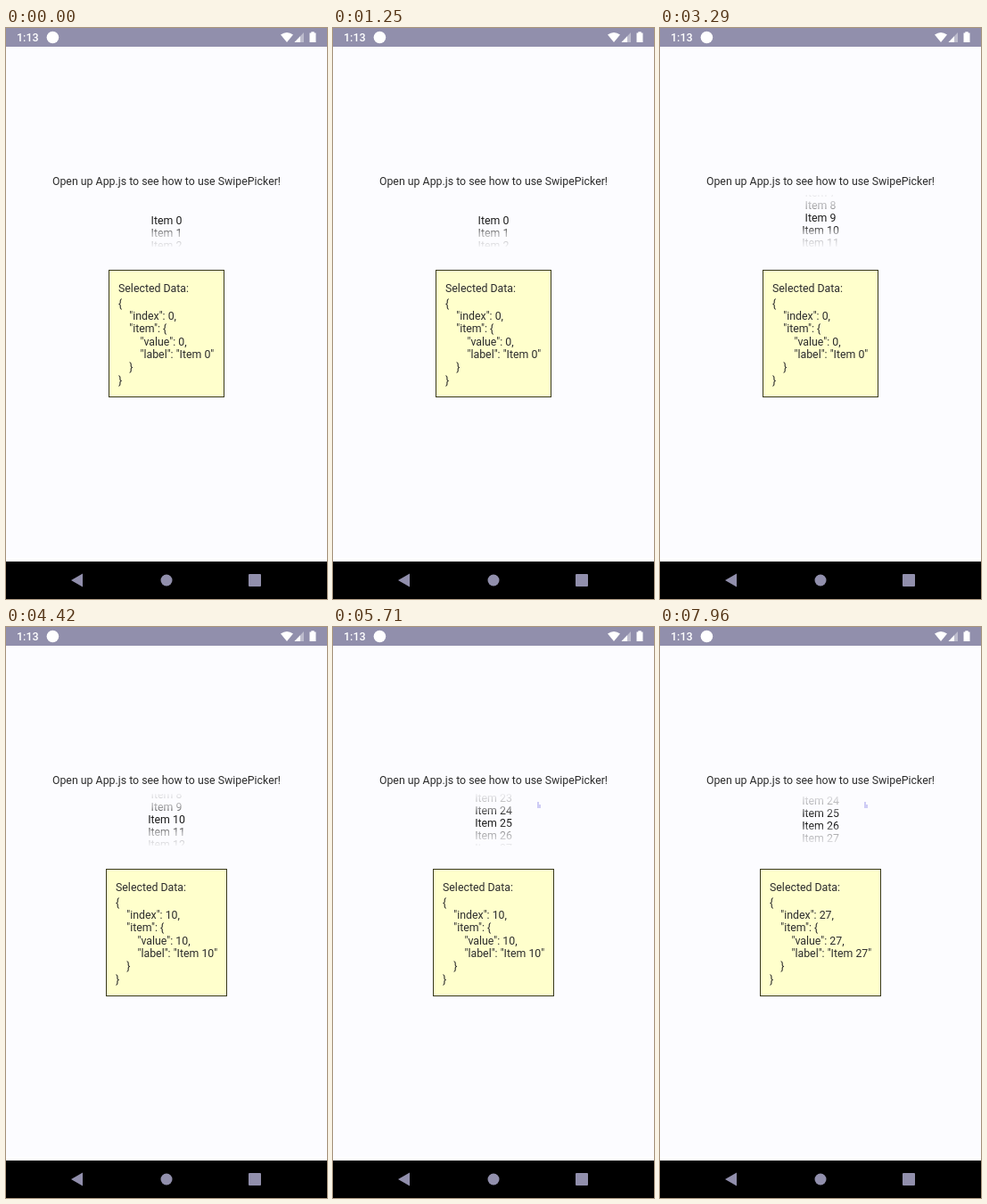
Recreate the animation shown at these times as an HTML page. Size 360 by 640 pixels, loop 8000 ms.

```html
<!DOCTYPE html>
<html lang="en">
<head>
<meta charset="utf-8">
<title>Swipe picker</title>
<style>
  html, body { margin: 0; width: 100%; height: 100%; overflow: hidden; background: #fcfcff; }
  svg { display: block; width: 360px; height: 640px; }
  text { font: 12.35px Roboto, sans-serif; fill: #2c2c2c; white-space: pre; }
  .middle { text-anchor: middle; }
  .clock { font-weight: 500; font-size: 12.5px; fill: #fff; }
  .item { fill: #1c1c1c; }
</style>
</head>
<body>
<svg viewBox="0 0 360 640">
  <defs>
    <linearGradient id="fade" gradientUnits="userSpaceOnUse" x1="0" y1="187" x2="0" y2="245">
      <stop offset="0" stop-color="#fff" stop-opacity=".06"/>
      <stop offset=".25" stop-color="#fff" stop-opacity=".4"/>
      <stop offset=".4" stop-color="#fff"/>
      <stop offset=".6" stop-color="#fff"/>
      <stop offset=".75" stop-color="#fff" stop-opacity=".4"/>
      <stop offset="1" stop-color="#fff" stop-opacity=".06"/>
    </linearGradient>
    <mask id="window" maskUnits="userSpaceOnUse" x="100" y="187" width="160" height="58">
      <rect x="100" y="187" width="160" height="58" fill="url(#fade)"/>
    </mask>
  </defs>

  <rect width="360" height="640" fill="#fcfcff"/>
  <rect width="360" height="21" fill="#918fac"/>
  <text class="clock" x="12" y="15">1:13</text>
  <g fill="#fff">
    <circle cx="52.4" cy="10.5" r="6.8"/>
    <path d="M308 7.6Q315 2.6 322 7.6L315 16Z"/>
    <path d="M334 5V16H323.5Z" opacity=".4"/>
    <path d="M330 9.2V16H323.5Z"/>
    <path d="M340.5 5.5H342.3V4.2H345.7V5.5H347.5V16H340.5Z"/>
  </g>

  <text class="middle" x="180" y="176">Open up App.js to see how to use SwipePicker!</text>
  <g mask="url(#window)"><g id="list"></g></g>
  <path id="touch" d="M229 196h2v3h2v4h-4z" fill="#ceccf5"/>

  <rect id="box" y="271.5" height="142" fill="#ffffcc" stroke="#38381c"/>
  <g id="data"></g>

  <rect y="594" width="360" height="4" fill="#fff"/>
  <rect y="598" width="360" height="42" fill="#000"/>
  <g fill="#918fac">
    <path d="M73 619L86 611.5V626.5Z"/>
    <circle cx="180" cy="619" r="6.5"/>
    <rect x="272" y="612" width="14" height="14" rx="1"/>
  </g>
</svg>
<script>
  const LOOP = 8000, ROW = 14;
  const byId = id => document.getElementById(id);
  const list = byId('list'), box = byId('box'), data = byId('data'), touch = byId('touch');

  function addText(parent, x, y, content, className = '') {
    const node = document.createElementNS('http://www.w3.org/2000/svg', 'text');
    node.setAttribute('x', x);
    node.setAttribute('y', y);
    node.setAttribute('class', className);
    node.textContent = content;
    parent.append(node);
  }

  for (let i = 0; i < 32; i++) addText(list, 180, 220 + i * ROW, `Item ${i}`, 'item middle');

  const drag = u => u * u;
  const fling = u => 1 - (1 - u) ** 3;

  // Successive flicks; each one settles on a whole row.
  const swipes = [
    { start: 1500, end: 2500, from: 0, to: 4, ease: fling },
    { start: 2800, end: 3800, from: 4, to: 10, ease: fling },
    { start: 4600, end: 5350, from: 10, to: 17, ease: fling },
    { start: 5350, end: 6280, from: 17, to: 27, ease: fling },
    { start: 7500, end: 8031, from: 27, to: 25, ease: drag }
  ];

  function positionAt(t) {
    let position = 0;
    for (const { start, end, from, to, ease } of swipes) {
      if (t < start) break;
      position = from + (to - from) * ease(Math.min(1, (t - start) / (end - start)));
    }
    return position;
  }

  const selectedAt = t => t < 3850 ? 0 : t < 6330 ? 10 : 27;
  const touchedAt = t => (t > 5350 && t < 5900) || t > 7500;

  let shown = -1;
  function showData(index) {
    if (index === shown) return;
    shown = index;
    const left = index < 10 ? 115.5 : 112.5;
    box.setAttribute('x', left);
    box.setAttribute('width', 360 - 2 * left);
    data.replaceChildren();
    addText(data, left + 10.5, 296, 'Selected Data:');
    const json = JSON.stringify({ index, item: { value: index, label: `Item ${index}` } }, null, 4);
    json.split('\n').forEach((line, i) => addText(data, left + 10.5, Math.round(312.6 + i * 14.35), line));
  }

  function draw(now) {
    const t = now % LOOP;
    list.setAttribute('transform', `translate(0 ${-positionAt(t) * ROW})`);
    touch.setAttribute('visibility', touchedAt(t) ? 'visible' : 'hidden');
    showData(selectedAt(t));
  }

  const began = performance.now();
  function tick() {
    draw(performance.now() - began);
    requestAnimationFrame(tick);
  }
  tick();
</script>
</body>
</html>
```
